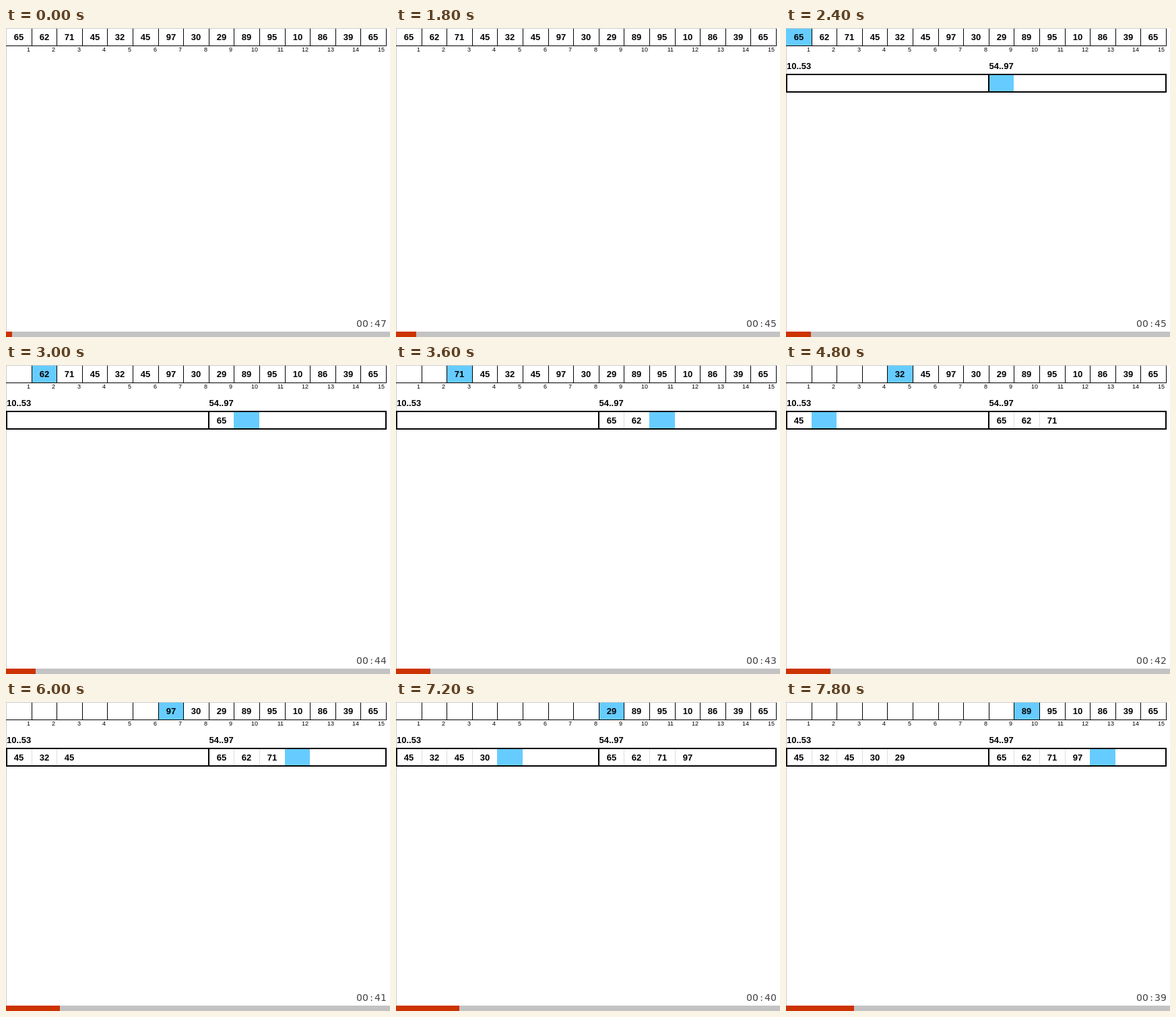
Write an HTML page with a canvas that moves like this. It is 570 px wide and 459 px high and loops after 8 s.

```html
<!DOCTYPE html>
<html>
<head>
<meta charset="utf-8">
<style>
html, body { margin: 0; width: 100%; height: 100%; overflow: hidden; background: #fff; }
canvas { display: block; }
</style>
</head>
<body>
<canvas id="stage" width="570" height="459"></canvas>
<script>
const ctx = document.getElementById('stage').getContext('2d');
const values = [65, 62, 71, 45, 32, 45, 97, 30, 29, 89, 95, 10, 86, 39, 65];
const LOOP = 8000, STEP = 600, FIRST_MOVE = 4, SPLIT = 8;
const BOLD = 'bold 13px "Liberation Sans", Arial, sans-serif';
const SMALL = '9px "Liberation Sans", Arial, sans-serif';
const CLOCK = '14px "DejaVu Sans", sans-serif';
const BLUE = '#66ccff';

const cellX = i => Math.round(37.6 * i);

function rect(color, x, y, w, h) {
  ctx.fillStyle = color;
  ctx.fillRect(x, y, w, h);
}

function text(str, x, y, font, align = 'center', color = '#000') {
  ctx.font = font;
  ctx.textAlign = align;
  ctx.fillStyle = color;
  ctx.fillText(str, x, y);
}

function fillCell(i, y, h) {
  rect(BLUE, cellX(i), y, cellX(i + 1) - cellX(i), h);
}

function drawInput(current) {
  if (current >= 0) fillCell(current, 1, 25);
  rect('#ccc', 0, 0, 565, 1);
  rect('#000', 0, 26, 565, 1);
  values.forEach((value, i) => {
    rect('#000', cellX(i + 1), 1, 1, 25);
    if (i >= current) text(value, cellX(i) + 19, 18, BOLD);
    text(i + 1, cellX(i + 1) - 2, 35, SMALL, 'right');
  });
}

function drawBuckets(current) {
  const next = [0, SPLIT];
  text('10..53', 1, 61, BOLD, 'left');
  text('54..97', 301.5, 61, BOLD, 'left');
  values.slice(0, current + 1).forEach((value, i) => {
    const slot = next[value < 54 ? 0 : 1]++;
    if (i === current) return fillCell(slot, 69, 26);
    if (slot % SPLIT) rect('#ddd', cellX(slot), 70, 1, 24);
    text(value, cellX(slot) + 19, 87, BOLD);
  });
  rect('#000', 0, 68, 565, 2);
  rect('#000', 0, 94, 565, 2);
  rect('#000', 0, 68, 2, 28);
  rect('#000', 300, 68, 2, 28);
  rect('#000', 563, 68, 2, 28);
}

function drawFooter(step) {
  const seconds = Math.floor(47.5 - step * STEP / 1000);
  [...`00:${seconds}`].forEach((c, i) => text(c, 524.5 + 9 * i, 444, CLOCK, 'center', '#444'));
  rect('#c3c3c3', 0, 451, 570, 8);
  rect('#cc3300', 0, 451, Math.round(8.5 + 7.15 * step), 8);
}

function draw(now) {
  const step = Math.floor(now % LOOP / STEP);
  const current = step - FIRST_MOVE;
  rect('#fff', 0, 0, 570, 459);
  rect('#ccc', 0, 0, 1, 451);
  drawInput(current);
  if (current >= 0) drawBuckets(current);
  drawFooter(step);
}

const start = performance.now();
function tick() {
  draw(performance.now() - start);
  requestAnimationFrame(tick);
}
tick();
</script>
</body>
</html>
```
